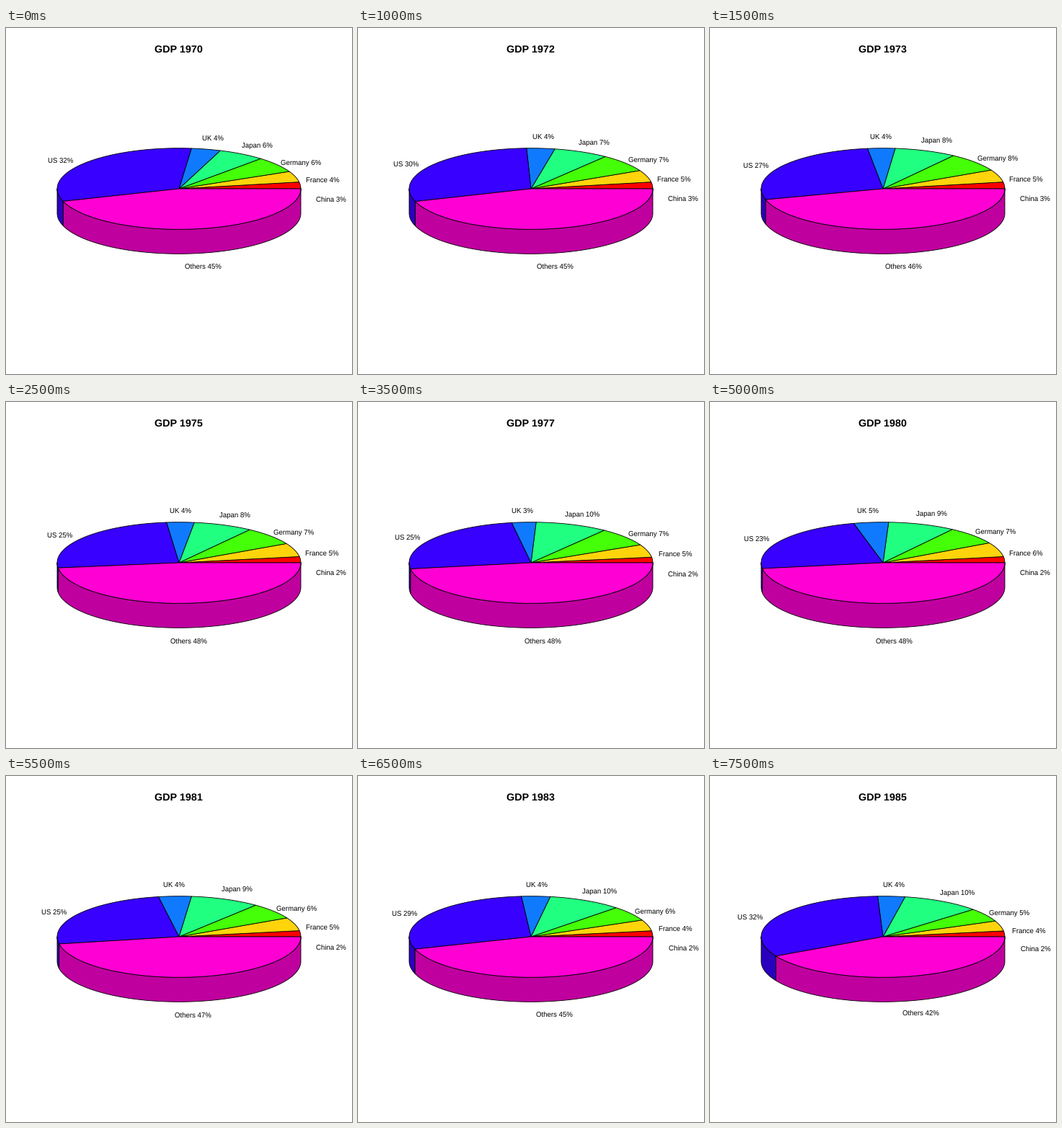
A matplotlib script that plays this animation: 480x480 px, repeating every 8 s.

```python
import numpy as np
import matplotlib.pyplot as plt
from matplotlib.animation import FuncAnimation

plt.rcParams["font.family"] = ["Liberation Sans", "DejaVu Sans"]
plt.rcParams["text.hinting"] = "none"

SIZE, DPI = 480, 100
CX, CY, RX, RY, DEPTH = 240, 223, 169, 56.3, 34
LABEL_RX, LABEL_RY, LABEL_Y = 211.5, 90.2, 244.7
LINE = 0.85
MIN_SEP = 0.3
START, YEARS = 1970, 16

# Turning points of each share: {year: percent}, straight lines between
TRENDS = {
    "China": {70: 2.65, 73: 2.65, 77: 2.2, 80: 2.42, 85: 2.3},
    "France": {70: 4.35, 75: 5.4, 77: 5.1, 80: 5.72, 83: 4.4, 85: 4.05},
    "Germany": {70: 6.3, 73: 7.57, 76: 7.2, 79: 7.95, 81: 6.5, 85: 5.4},
    "Japan": {70: 6.2, 71: 6.4, 73: 8.2, 75: 7.85, 78: 10.44, 80: 8.9, 85: 10.35},
    "UK": {70: 3.87, 73: 3.63, 75: 3.64, 77: 3.22, 80: 4.6, 83: 3.8, 85: 3.6},
    "US": {70: 31.65, 72: 29.5, 73: 27.3, 75: 25.4, 78: 24.6, 80: 23.4, 85: 32.2},
}
NAMES = [*TRENDS, "Others"]
COLORS = ["#ff0000", "#ffd40b", "#44ff08", "#21ff80",
          "#107aff", "#3800ff", "#ff00d4"]

fig = plt.figure(figsize=(SIZE / DPI, SIZE / DPI), dpi=DPI, facecolor="white")
ax = fig.add_axes([0, 0, 1, 1])


def px(n):
    return n * 72 / DPI


def shares(year):
    parts = [np.interp(year - 1900, list(t), list(t.values()))
             for t in TRENDS.values()]
    return np.array(parts + [100 - sum(parts)])


def arc(a, b, drop=0):
    t = np.linspace(a, b, max(8, int(abs(b - a) * 50)))
    return np.column_stack([CX + RX * np.cos(t), CY - RY * np.sin(t) + drop])


def shape(points, color, shade=1):
    face = np.array(plt.matplotlib.colors.to_rgb(color)) * shade
    ax.add_patch(plt.Polygon(points, facecolor=face, edgecolor="black",
                             linewidth=px(LINE), joinstyle="round"))


def spread(angles):
    """Push neighbouring labels apart to a minimum angle."""
    angles = angles.copy()
    for i in range(len(angles) - 1):
        push = max(0, MIN_SEP - (angles[i + 1] - angles[i])) / 2
        angles[i] -= push
        angles[i + 1] += push
    return angles


def write(x, y, text, size, **kw):
    ax.text(x, y, text, fontsize=px(size), ha="center", va="baseline",
            color="black", **kw)


def draw(i):
    ax.clear()
    ax.set(xlim=(0, SIZE), ylim=(SIZE, 0))
    ax.axis("off")

    parts = shares(START + i)
    edges = np.concatenate([[0], np.cumsum(parts)]) * 2 * np.pi / 100
    slices = list(zip(edges, edges[1:], COLORS))

    for a, b, color in slices:
        if b > np.pi:
            a = max(a, np.pi)
            shape(np.vstack([arc(a, b), arc(b, a, DEPTH)]), color, 0.75)
    for a, b, color in slices:
        shape(np.vstack([[CX, CY], arc(a, b)]), color)

    write(CX - 0.3, 34, f"GDP {START + i}", 14.4, weight="bold")
    for t, name, part in zip(spread((edges[:-1] + edges[1:]) / 2), NAMES, parts):
        write(CX + LABEL_RX * np.cos(t), LABEL_Y - LABEL_RY * np.sin(t),
              f"{name} {part:.0f}%", 9.6)
    return []


anim = FuncAnimation(fig, draw, frames=YEARS, interval=500,
                     repeat=True, repeat_delay=0, blit=False)
plt.show()
```
